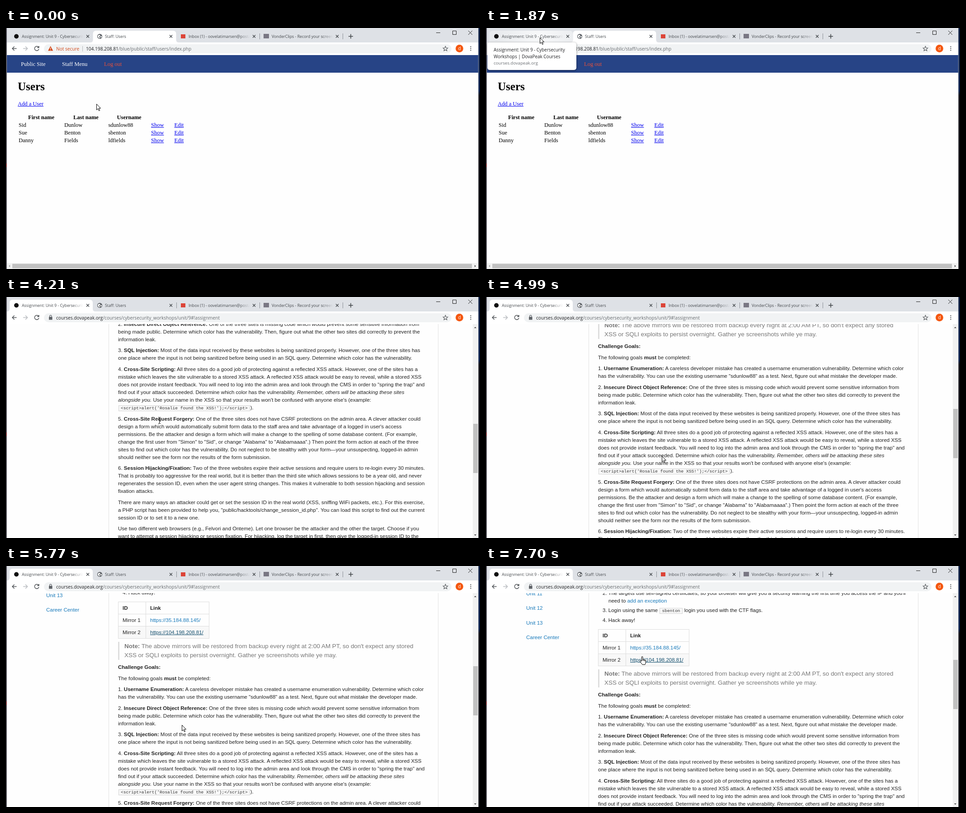
Write an HTML page that moves like this. It is 1049x534 px and loops after 8000 ms.

```html
<!DOCTYPE html>
<html lang="en">
<head>
<meta charset="utf-8">
<title>Browser session</title>
<style>
  html, body { margin: 0; width: 100%; height: 100%; overflow: hidden; }
  body { position: relative; background: #fefefe; }
  body > *, .text { position: absolute; }
  .layer { inset: 0; clip-path: inset(60px 4px 0 2px); }
  .text { white-space: pre; line-height: 20px; }
  svg { left: 0; top: 0; overflow: visible; }

  #users { font: 12.5px "Liberation Serif", serif; color: #000; }
  #users .bar { position: absolute; left: 0; top: 60px; width: 1049px; height: 38.5px; background: #274486; }
  #users u { color: #00e; }

  #course { font: 11.52px "Liberation Sans", sans-serif; color: #222; }
  #scroller { position: absolute; left: 0; top: 0; }
  #course a { color: #1779ba; }
  #course code {
    font: 9.56px "Liberation Mono", monospace; color: #333; line-height: 11px;
    background: #f8f8f8; border: 1px solid #d3d3d3; padding: 0 4px; margin: 0 1px;
  }
  #goals { position: absolute; left: 248px; top: 277px; line-height: 17px; }
  #goals p { margin: 0 0 7.6px; white-space: pre; }
  #mirrors { position: absolute; left: 247.5px; top: 139.5px; width: 200px; height: 80px; border: 1px solid #ddd;
    background: linear-gradient(90deg, #0000 60px, #ddd 60px 61px, #0000 61px),
      linear-gradient(#0000 26px, #ddd 26px 27px, #0000 27px 53px, #ddd 53px 54px, #f8f8f8 54px); }
  #quote { position: absolute; left: 248px; top: 229px; height: 40px; border-left: 3px solid #ddd; }
  .edge { position: absolute; top: 60px; width: 1px; height: 474px; background: #e2e2e2; }

  #toolbar { inset: 0; font: 8.8px "Open Sans", sans-serif; color: #45494d; }
  .url { font-size: 10.15px; color: #686c70; }
  .url b { font-weight: 400; color: #202124; }
  .tab { width: 136px; overflow: hidden; mask-image: linear-gradient(90deg, #000 112px, #0000 136px); }
  #tip { left: 3px; top: 32px; width: 197px; height: 61px; border-radius: 5px; background: #fff; box-shadow: 0 1px 4px #0007;
    font: 9.9px "Open Sans", sans-serif; color: #202124; }
</style>
</head>
<body>
<div id="users" class="layer"><div class="bar"></div></div>

<div id="course" class="layer">
  <div id="scroller">
    <div id="mirrors"></div>
    <div id="quote"></div>
    <div id="goals">
<p><b>Challenge Goals:</b></p>
<p>The following goals <b>must</b> be completed:</p>
<p>1. <b>Username Enumeration:</b> A careless developer mistake has created a username enumeration vulnerability. Determine which color
has the vulnerability. You can use the existing username "sdunlow88" as a test. Next, figure out what mistake the developer made.</p>
<p>2. <b>Insecure Direct Object Reference:</b> One of the three sites is missing code which would prevent some sensitive information from
being made public. Determine which color has the vulnerability. Then, figure out what the other two sites did correctly to prevent the
information leak.</p>
<p>3. <b>SQL Injection:</b> Most of the data input received by these websites is being sanitized properly. However, one of the three sites has
one place where the input is not being sanitized before being used in an SQL query. Determine which color has the vulnerability.</p>
<p>4. <b>Cross-Site Scripting:</b> All three sites do a good job of protecting against a reflected XSS attack. However, one of the sites has a
mistake which leaves the site vulnerable to a stored XSS attack. A reflected XSS attack would be easy to reveal, while a stored XSS
does not provide instant feedback. You will need to log into the admin area and look through the CMS in order to "spring the trap" and
find out if your attack succeeded. Determine which color has the vulnerability. <i>Remember, others will be attacking these sites
alongside you.</i> Use your name in the XSS so that your results won't be confused with anyone else's (example:
<code>&lt;script>alert('Rosalie found the XSS!');&lt;/script></code>).</p>
<p>5. <b>Cross-Site Request Forgery:</b> One of the three sites does not have CSRF protections on the admin area. A clever attacker could
design a form which would automatically submit form data to the staff area and take advantage of a logged in user's access
permissions. Be the attacker and design a form which will make a change to the spelling of some database content. (For example,
change the first user from "Simon" to "Sid", or change "Alabama" to "Alabamaaaa".) Then point the form action at each of the three
sites to find out which color has the vulnerability. Do not neglect to be stealthy with your form—your unsuspecting, logged-in admin
should neither see the form nor the results of the form submission.</p>
<p>6. <b>Session Hijacking/Fixation:</b> Two of the three websites expire their active sessions and require users to re-login every 30 minutes.
That is probably too aggressive for the real world, but it is better than the third site which allows sessions to be a year old, and never
regenerates the session ID, even when the user agent string changes. This makes it vulnerable to both session hijacking and session
fixation attacks.</p>
<p>There are many ways an attacker could get or set the session ID in the real world (XSS, sniffing WiFi packets, etc.). For this exercise,
a PHP script has been provided to help you, "public/hacktools/change_session_id.php". You can load this script to find out the current
session ID or to set it to a new one.</p>
<p>Use two different web browsers (e.g., Felvori and Onteme). Let one browser be the attacker and the other the target. Choose if you
want to attempt a session hijacking or session fixation. For hijacking, log the target in first, then give the logged-in session ID to the
attacker. For fixation, get a session ID for the attacker, give it to the target, then the target will log in. In both cases, the attacker should
now have access to the staff area.</p>
<p>Determine which color has the vulnerability.</p>
<p>The following advanced goals are <b>optional</b>:</p>
    </div>
  </div>
  <div class="edge" style="left:227px"></div>
  <div class="edge" style="left:956px"></div>
</div>

<svg width="1049" height="534" fill="none">
  <defs>
    <linearGradient id="desk" x2="0" y2="1">
      <stop stop-color="#0b1d40"/><stop offset=".26" stop-color="#0d2350"/>
      <stop offset=".28" stop-color="#17161c"/><stop offset="1" stop-color="#101014"/>
    </linearGradient>
    <radialGradient id="glow" gradientUnits="userSpaceOnUse" cx="119" cy="19" r="90">
      <stop stop-color="#f8f9fa"/><stop offset="1" stop-color="#e9ebee"/>
    </radialGradient>
    <path id="tabShape" d="M2 32q6 0 6-6V13q0-7 7-7H185q7 0 7 7V26q0 6 6 6z"/>
  </defs>
  <path fill="#dee1e6" d="M0 0H1046V32H0z"/>
  <path fill="#fff" d="M0 32H1046V60H0z"/>
  <use id="hover" href="#tabShape" fill="url(#glow)"/>
  <use id="active" href="#tabShape" fill="#fff"/>
  <rect x="84" y="36" width="902" height="20" rx="10" fill="#f1f3f4"/>
  <path stroke="#8b9096" d="M561.5 12V25M745.5 12V25"/>
  <path id="separator" stroke="#8b9096" d="M377.5 12V25"/>
  <circle cx="23" cy="18.5" r="5" fill="#111"/>
  <circle cx="207.5" cy="18.5" r="5.5" fill="#5f6368"/>
  <path fill="#fff" d="M204 16l3-1 2 2-3 2 2 3-2 1-3-4zM209 18l3 0-1 3-2 0z"/>
  <path fill="#dc4437" d="M387 14H397V23H387z"/>
  <path fill="#797783" d="M570 13H582V23H570z"/>
  <path id="closers" stroke="#44484c" stroke-width="1.3"/>
  <path stroke="#3c4043" stroke-width="1.5" d="M758 18.5H768M763 13.5V23.5"/>
  <path stroke="#222" d="M952 10.5H961M988.5 6.5H996.5V14.5H988.5zM1023 6l9 9M1032 6l-9 9"/>
  <path stroke="#505458" stroke-width="1.5" d="M23.5 45.5H14M18.5 41l-4.5 4.5 4.5 4.5M72 42.5a4.8 4.8 0 1 0 .8 4M72.8 40V43.5H69"/>
  <path stroke="#b9bcc0" stroke-width="1.5" d="M38 45.5H47.5M43 41l4.5 4.5-4.5 4.5"/>
  <g id="insecure">
    <path fill="#d34a1c" d="M98.5 40l5.7 10.5H93z"/>
    <path stroke="#fff" stroke-width="1.2" d="M98.5 43.5V47M98.5 48V49.3"/>
    <path stroke="#b5b8bc" d="M169.5 40V52"/>
  </g>
  <g id="secure">
    <path fill="#5f6368" d="M95 44H102.5V50.5H95z"/>
    <path stroke="#5f6368" stroke-width="1.2" d="M96.6 44V42.5a2.1 2.1 0 0 1 4.2 0V44"/>
  </g>
  <path stroke="#505458" stroke-width="1.1" d="M972.5 40.5l1.5 3.5 3.8.3-2.9 2.5.9 3.7-3.3-2-3.3 2 .9-3.7-2.9-2.5 3.8-.3z"/>
  <circle cx="1003.5" cy="45.5" r="8.5" fill="#f4570f"/>
  <path stroke="#505458" stroke-width="2.3" stroke-linecap="round" d="M1028.5 41.5v0M1028.5 45.5v0M1028.5 49.5v0"/>
  <g id="barX">
    <path fill="#f1f1f1" d="M2 521H1045V534H2z"/>
    <path fill="#c1c1c1" d="M14 522.5H1031V532.5H14z"/>
    <path fill="#a3a3a3" d="M9 525v5l-3-2.5z"/><path fill="#505050" d="M1037 525v5l3-2.5z"/>
  </g>
  <g id="barY">
    <path fill="#f1f1f1" d="M1033 60H1045V534H1033z"/>
    <path id="thumb" fill="#c1c1c1" d="M1034 208H1044V317H1034z"/>
    <path fill="#505050" d="M1036 69h5l-2.5-3zM1036 526h5l-2.5 3z"/>
  </g>
  <path fill="url(#desk)" d="M1045.5 0H1049V534H1045.5z"/>
  <path fill="#22202a" d="M0 0H1.5V534H0z"/>
  <path fill="#8b2a2c" d="M0 300H1.5V308H0z"/>
</svg>

<div id="toolbar"></div>
<div id="tip"></div>

<svg id="pointer" width="1" height="1" stroke="#000" fill="#fff">
  <path id="arrow" d="M.5.5V13.5l3-2.8 2.2 4.8 1.9-.9-2.1-4.7H9.5z"/>
  <path id="beam" fill="none" d="M-2 -6.5H0M1-6.5H3M.5-6V7M-2 7.5H0M1 7.5H3"/>
  <path id="hand" d="M4.5 11V2q0-1.5 1.2-1.5T7 2V7q2-.8 2.2.6 2-.6 2.2.8 2.1-.3 2.1 1.6V14l-1.5 4.5H6L1 11.5q-.6-2 1.2-1.8zM7 7v3M9.2 8v2.5M11.4 8.5V11"/>
</svg>

<script>
const $ = id => document.getElementById(id);

// Places one line of text with its middle at y.
function text(parent, x, y, html, css = "", cls = "") {
  $(parent).insertAdjacentHTML("beforeend",
    `<div class="text ${cls}" style="left:${x}px;top:${y - 10}px;${css}">${html}</div>`);
}

text("users", 33, 80, "Public Site", "color:#fff");
text("users", 124, 80, "Staff Menu", "color:#fff");
text("users", 217, 80, "Log out", "color:#e8503a");
text("users", 26, 129.5, "<b>Users</b>", "font-size:25px");
text("users", 26, 168, "<u>Add a User</u>");
[[49, "First name"], [149, "Last name"], [245.5, "Username"]].forEach(([x, s]) => text("users", x, 198, `<b>${s}</b>`));
[["Sid", "Dunlow", "sdunlow88"], ["Sue", "Benton", "sbenton"], ["Danny", "Fields", "ldfields"]].forEach((row, r) =>
  [...row, "<u>Show</u>", "<u>Edit</u>"].forEach((s, c) => text("users", [28, 129, 226.5, 321, 372.5][c], 215 + 17 * r, s)));

["Unit 11", "Unit 12", "Unit 13", "Career Center"].forEach((s, i) => text("scroller", 89, 61 + 32.3 * i, `<a>${s}</a>`));
text("scroller", 258, 59.5, "2. The targets use self-signed certificates, so your browser will give you a security warning the first time you access the IP and you'll");
text("scroller", 271, 76.5, "need to <a>add an exception</a>");
text("scroller", 258, 98, "3. Login using the same <code>sbenton</code> login you used with the CTF flags.");
text("scroller", 258, 119.5, "4. Hack away!");
[["<b>ID</b>", "<b>Link</b>"], ["Mirror 1", "<a>https://35.184.88.145/</a>"],
 ["Mirror 2", '<a style="color:#14506f;text-decoration:underline">https://104.198.208.81/</a>']].forEach(([id, link], i) => {
  text("scroller", 258, 153.5 + 27 * i, id);
  text("scroller", 319, 153.5 + 27 * i, link);
});
["<b>Note:</b> The above mirrors will be restored from backup every night at 2:00 AM PT, so don't expect any stored",
 "XSS or SQLI exploits to persist overnight. Gather ye screenshots while ye may."].forEach((s, i) =>
  text("scroller", 262, 239 + 20 * i, s, "font-size:13.44px;color:#777"));

[[35, "Assignment: Unit 9 - Cybersecurity"], [219, "Staff: Users"],
 [404, "Inbox (1) - oovelatimarsen@postal"], [588, "VonderClips - Record your screen"]].forEach(([x, s]) =>
  text("toolbar", x, 18.5, s, "", "tab"));
text("toolbar", 1000.5, 45, "d", "color:#fff;font-size:10px");
text("toolbar", 111, 45.5, '<span style="color:#d34a1c">Not secure</span>', "", "url");
text("toolbar", 177, 45.5, "<b>104.198.208.81</b>/blue/public/staff/users/index.php", "", "url");
text("toolbar", 111, 45.5, "<b>courses.dovapeak.org</b>/courses/cybersecurity_workshops/unit/9#!assignment", "", "url onCourse");
text("tip", 14, 15.5, "Assignment: Unit 9 - Cybersecurity");
text("tip", 14, 31, "Workshops | DovaPeak Courses");
text("tip", 14, 46, "courses.dovapeak.org", "color:#6a6e73;font-size:9.6px");
$("closers").setAttribute("d", [181, 365, 549, 733].map(x => `M${x - 3} 15.5l6 6m0-6l-6 6`).join(""));

// time, pointer, x, y, and how far the course page is scrolled
const poses = [
  [0, "arrow", 200, 168], [80, "arrow", 192, 142], [157, "arrow", 174, 96], [233, "arrow", 154, 54], [310, "arrow", 138, 33],
  [690, "arrow", 126, 28], [1090, "arrow", 119, 21],
  [3430, "arrow", 338, 272, 413], [3820, "beam", 339, 273, 364], [4210, "beam", 339, 273, 316],
  [4990, "arrow", 389, 352, 176], [5370, "arrow", 389, 352, 118], [5770, "arrow", 389, 352, 61],
  [6530, "hand", 346, 208, 0], [6920, "hand", 345, 206, 0], [7310, "arrow", 345, 167, 0], [7700, "hand", 340, 200, 0],
];
const show = (el, on) => el.style.display = on ? "" : "none";

function draw(t) {
  const [, pointer, x, y, scroll = 0] = poses.findLast(p => p[0] <= t);
  const onCourse = t >= 3430;
  for (const id of ["users", "insecure", "barX"]) show($(id), !onCourse);
  for (const id of ["course", "secure", "barY", "separator"]) show($(id), onCourse);
  document.querySelectorAll(".url").forEach(el => show(el, el.classList.contains("onCourse") === onCourse));

  $("active").setAttribute("x", onCourse ? 0 : 184.5);
  $("hover").style.opacity = onCourse || t < 310 ? 0 : t < 690 ? 0.5 : 1;
  $("tip").style.opacity = onCourse || t < 1490 ? 0 : t < 1870 ? 0.35 : 1;
  $("scroller").style.top = -scroll + "px";
  $("thumb").setAttribute("transform", `translate(0 ${Math.round(scroll * 0.23)})`);

  for (const id of ["arrow", "beam", "hand"]) show($(id), id === pointer);
  $("pointer").style.left = x + "px";
  $("pointer").style.top = y + "px";
}

function tick() {
  draw(performance.now() % 8000);
  requestAnimationFrame(tick);
}
tick();
</script>
</body>
</html>
```
